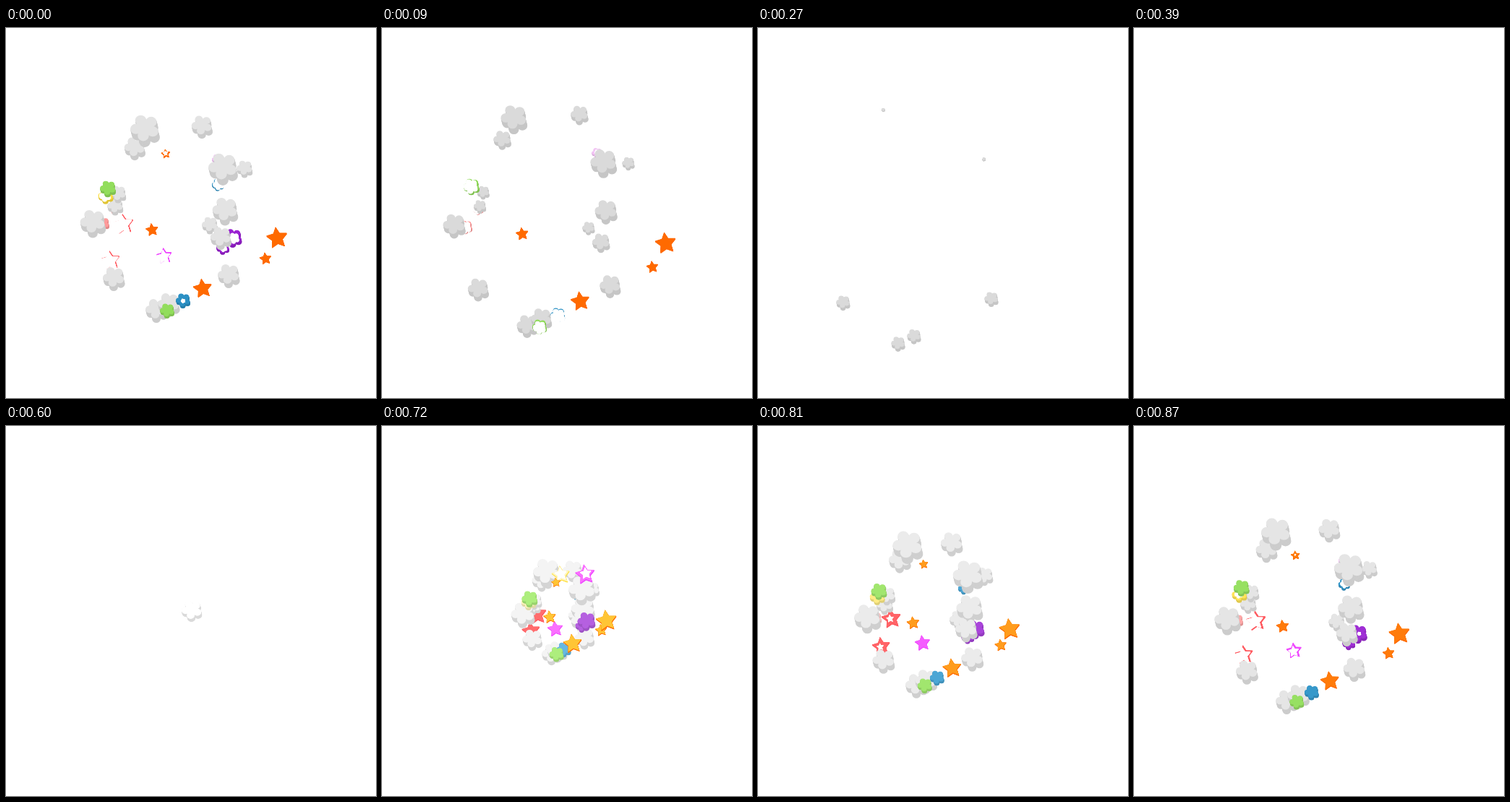
An HTML page with a canvas that plays this animation: 512 by 512 pixels, repeating every 900 ms.

```html
<!DOCTYPE html>
<html lang="en">
<head>
<meta charset="utf-8">
<title>Burst</title>
<style>
  html, body { margin: 0; width: 100%; height: 100%; overflow: hidden; background: #fff; }
  canvas { display: block; width: 512px; height: 512px; }
</style>
</head>
<body>
<canvas id="stage" width="512" height="512"></canvas>
<script>
const ctx = document.getElementById('stage').getContext('2d');
const LOOP = 900, STEP = 30, BURST_AT = 600, LIFE = 690;
const CX = 257, CY = 254, TAU = Math.PI * 2;
const POSE = 300;   // age at which the places below hold
const ERODE = 120;  // how long a piece takes to be eaten away

// Puffs by radius, far to near
const puffs = [
  [11.5, [151, 245], [155, 228], [282, 271], [330, 193]],
  [18, [120, 267], [303, 250]],
  [15, [271, 134], [178, 164], [149, 344], [208, 388], [225, 380], [297, 288], [308, 340]],
  [20.5, [192, 138], [300, 191]]
].flatMap(([r, ...spots]) => spots.map(([x, y]) =>
  ({ x, y, r, life: y > 330 ? LIFE : 400 + 9 * r })));

// Each tone runs from its colour at birth to the one at the pose
const tones = {
  orange: ['#ffe84a', '#ff6a00'],
  red: ['#ff7474', '#ff5a60'],
  pink: ['#ff80ff', '#ee45ff'],
  pale: ['#ffffff', '#f3c4f5'],
  blush: ['#ffffff', '#ff9a9a'],
  lemon: ['#fffff0', '#ffe040'],
  purple: ['#bf78e6', '#9a22d2'],
  blue: ['#7cc8ee', '#2b90c4'],
  green: ['#b8f58a', '#92dd5c']
};

// Shape, tone, age when gone, age when it passes behind the puffs, [x, y, r] of each
const confetti = [
  [flower, 'blush', 420, 0, [134, 270, 9], [149, 249, 7]],
  [flower, 'pale', 480, 0, [292, 181, 7]],
  [flower, 'blue', 330, 0, [293, 216, 8]],
  [star, 'red', 315, 0, [163, 271, 14], [145, 321, 13]],
  [flower, 'purple', 385, 150, [300, 303, 9], [314, 289, 12.5]],
  [star, 'lemon', 190, LIFE, [236, 151, 13]],
  [star, 'pink', 205, LIFE, [310, 149, 14]],
  [star, 'pink', 340, LIFE, [219, 315, 11]],
  [flower, 'lemon', 360, LIFE, [138, 231, 10.5]],
  [star, 'orange', 385, LIFE, [221, 174, 6.5]],
  [flower, 'blue', 410, LIFE, [245, 376, 10]],
  [flower, 'green', 430, LIFE, [141, 221, 11], [223, 390, 10]],
  [star, 'orange', 550, LIFE,
    [359, 319, 8.5], [375, 290, 15], [272, 360, 13.5], [202, 279, 9]]
].flatMap(([shape, tone, gone, back, ...spots]) => spots.map(([x, y, r]) =>
  ({ shape, tone: tones[tone], gone, back, x, y, r })));

const clamp = v => Math.max(0, Math.min(1, v));
const rgb = c => `rgb(${c.map(Math.round).join(',')})`;
const grey = v => rgb([v, v, v]);
const parse = hex => [1, 3, 5].map(i => parseInt(hex.slice(i, i + 2), 16));
const mix = ([a, b], k) => {
  const to = parse(b);
  return parse(a).map((v, i) => v + (to[i] - v) * k);
};

// Outward travel with drag, equal to 1 at the pose, plus a slight fall
function place(p, t) {
  const u = t / POSE;
  const out = 1.35 * (1 - Math.exp(-1.35 * u ** 1.3));
  return [CX + (p.x - CX) * out, CY + (p.y - CY) * out + 5 * u * (u - 1)];
}

function flower(x, y, r) {
  ctx.beginPath();
  for (let i = 0; i < 5; i++) {
    const a = (i - 0.62) * TAU / 5;
    const px = x + Math.cos(a) * r * 0.61, py = y + Math.sin(a) * r * 0.56;
    ctx.moveTo(px + r * 0.38, py);
    ctx.ellipse(px, py, r * 0.38, r * 0.35, 0, 0, TAU);
  }
  ctx.moveTo(x + r * 0.5, y);
  ctx.arc(x, y, r * 0.5, 0, TAU);
  ctx.fill();
}

function star(x, y, r) {
  ctx.beginPath();
  for (let i = 0; i < 10; i++) {
    const a = (i - 2.72) * TAU / 10, q = i % 2 ? r * 0.5 : r;
    ctx.lineTo(x + Math.cos(a) * q, y + Math.sin(a) * q);
  }
  ctx.closePath();
  ctx.fill();
}

// A face with its thickness running down and slightly right
function solid(shape, x, y, r, depth, face, edge) {
  ctx.fillStyle = edge;
  for (let i = 6; i > 0; i--) {
    const d = depth * r * i / 6;
    shape(x + d * 0.25, y + d, r);
  }
  ctx.fillStyle = face;
  shape(x, y, r);
}

function drawPuff(p, t) {
  if (t >= p.life) return;
  const [x, y] = place(p, t);
  const grow = clamp(t / 180), k = clamp(t / 390);
  const r = p.r * (0.7 + 0.33 * grow) * (1 - (t / p.life) ** 5);
  solid(flower, x, y, r, 0.28 + 0.14 * grow, grey(255 - 37 * k), grey(218 - 20 * k));
}

function drawPiece(p, t) {
  if (t >= p.gone) return;
  const [x, y] = place(p, t);
  const r = p.r * clamp(t / 90);
  const depth = p.shape === star ? 0.1 : 0.3;
  const color = mix(p.tone, clamp(t / POSE) ** 1.4);
  const edge = p.shape === star ? p.tone[1] : rgb(color.map(v => v * 0.88));
  solid(p.shape, x, y, r, depth, rgb(color), edge);

  // A white copy grows over it, shifted away from the burst
  const eaten = clamp(1 - (p.gone - t) / ERODE);
  if (eaten > 0) {
    const a = Math.atan2(p.y - CY, p.x - CX), shift = r * 0.12;
    solid(p.shape, x + Math.cos(a) * shift, y + Math.sin(a) * shift,
      r * 1.08 * Math.sqrt(eaten), depth, '#fff', '#fff');
  }
}

function draw(t) {
  ctx.fillStyle = '#fff';
  ctx.fillRect(0, 0, 512, 512);
  if (t >= LIFE) return;
  confetti.filter(p => t >= p.back).forEach(p => drawPiece(p, t));
  puffs.forEach(p => drawPuff(p, t));
  confetti.filter(p => t < p.back).forEach(p => drawPiece(p, t));
}

const start = performance.now();
function tick() {
  const held = Math.floor((performance.now() - start + 2) / STEP) * STEP;
  draw((held + LOOP - BURST_AT) % LOOP);
  requestAnimationFrame(tick);
}
tick();
</script>
</body>
</html>
```
